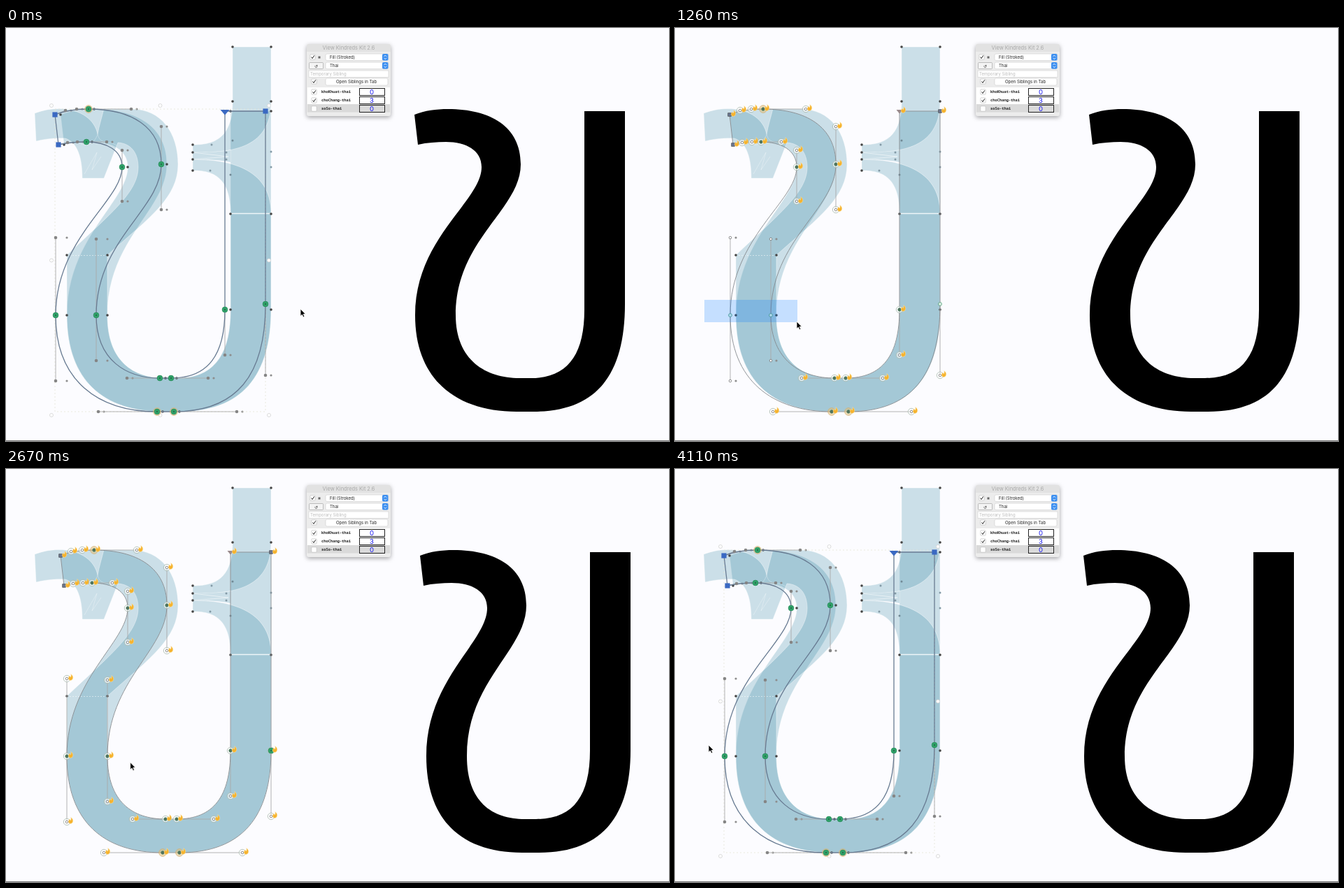
Animation, 948 px wide and 591 px high, one loop 4.14 s. Source, as an HTML page:

```html
<!DOCTYPE html>
<html lang="en">
<head>
<meta charset="utf-8">
<title>Glyph alignment</title>
<style>
  html, body { margin: 0; width: 100%; height: 100%; overflow: hidden; background: #fcfcff; }
  svg { display: block; width: 948px; height: 591px; }
  text { font-family: Inter, Roboto, "Liberation Sans", sans-serif; font-size: 6px; fill: #222; }
  .sib { fill: rgba(7, 107, 140, .2); stroke: rgba(255, 255, 255, .4); stroke-width: 1; }
  .seam { fill: none; stroke: rgba(255, 255, 255, .5); stroke-width: 1; }
  .dash { fill: none; stroke: #e4e4d6; stroke-width: .8; stroke-dasharray: 2 3; }
  .mono { font: bold 5.4px "Noto Sans Mono", "DejaVu Sans Mono", monospace; }
  .num { font-size: 9.5px; fill: #1515ee; text-anchor: middle; }
  .panel { filter: drop-shadow(0 2px 3px rgba(0, 0, 0, .35)); }
</style>
</head>
<body>
<svg viewBox="0 0 948 591">
  <defs>
    <path id="flame" d="M1 3.5C-.8 1 1.4-.6 1.8-2C2.6-1.2 3-.8 3.1.1C4.4-1 4.2-2.8 3.7-4.4C6.3-2.9 7.5.2 6.2 2.5C5.2 4.7 2.2 5 1 3.5Z" fill="#f6b32e" stroke="#fbe3a4" stroke-width=".5"/>
  </defs>

  <g id="siblings">
    <path class="sib" id="sibA"/>
    <path class="sib" d="M41 122C54 117 67 115 80 115.5C107 117 127 131 131 152C133 140 137 128 140 115.5L180 116C222 116 246 150 246 195C246 245 200 275 145 325V411C145 476 181 501 228 501H244C297 501 321 468 321 403V266H379V403C379 497 338 549 248 549H224C140 549 87 505 87 411V325C150 265 189 235 189 199C189 178 178 165 160 164L140 215H109C109 195 106 165 85 158C70 157 55 159 43 162Z"/>
    <path class="sib" d="M324 27H379V105C379 177 315 178 267 178V167C294 167 324 161 324 105Z"/>
    <path class="sib" d="M267 188C315 188 379 199 379 265H321C321 210 292 204 267 204Z"/>
    <path class="sib" style="stroke:none" d="M267 178C290 178 305 177.5 321 175V192C305 188.5 290 188 267 188Z"/>
    <path class="seam" d="M267 178L318 184L267 188M321 265.5H379"/>
    <path class="seam" d="M112 209L130 178L123 203L136 184M107 166C120 171 128 161 131 152M131 152C135 168 146 160 158 168" opacity=".6"/>
    <path class="seam" d="M87 325.5H145" stroke-dasharray="2 2"/>
  </g>
  <g id="marks"></g>
  <path id="black"  transform="translate(514)"/>
  <g id="edit"></g>
  <rect id="marquee" fill="rgba(0,120,255,.22)"/>

  <g class="panel">
    <rect x="430" y="23" width="120" height="103" rx="3" fill="#ececec"/>
  </g>
  <path d="M430 34V26a3 3 0 0 1 3-3H547a3 3 0 0 1 3 3V34Z" fill="#e2e2e2"/>
  <text x="490" y="31.3" text-anchor="middle" style="font-size:7.4px;fill:#a9a9a9">View Kindreds Kit 2.6</text>
  <g fill="#fff" stroke="#cfcfcf" stroke-width=".6">
    <rect x="457" y="37" width="90" height="9.5" rx="2"/>
    <rect x="457" y="49" width="90" height="9.5" rx="2"/>
    <rect x="433.500" y="49.500" width="20" height="9" rx="1" fill="#f4f4f4" stroke="#999"/>
    <rect x="433" y="61" width="114" height="9.500"/>
    <rect x="457" y="72" width="89" height="10" rx="2"/>
    <rect x="431" y="85" width="118" height="24" stroke="none"/>
    <rect x="431" y="109" width="118" height="11.500" fill="#dadada" stroke="none"/>
  </g>
  <rect x="446.500" y="40.500" width="3" height="3" fill="#666"/>
  <g id="steppers"></g>
  <text x="463" y="44">Fill (Stroked)</text>
  <text x="463" y="56">Thai</text>
  <text x="443.500" y="56.500" text-anchor="middle" style="font-family:'DejaVu Sans',sans-serif">↺</text>
  <text x="435" y="67.700" style="fill:#bdbdbd">Temporary Sibling</text>
  <text x="501" y="79.300" text-anchor="middle">Open Siblings in Tab</text>
  <g id="rows"></g>

  <path d="M0 590.5H948" stroke="#777"/>
  <path id="cursor" d="M0 0V10.300L2.400 8.200L4 11.800L5.800 11L4.200 7.500H7.300Z" fill="#000" stroke="#fff" stroke-width=".8"/>
</svg>
<script>
const LOOP = 4140, STEP = 30, NUDGE = 8;
const $ = id => document.getElementById(id);

// Outline in its aligned position
const OUTLINE = 'M83 167 C96 164 110 163 123 163 C152 163 174 175 174 199 C174 248 87 300 87 411 ' +
  'C87 505 140 549 224 549 L248 549 C338 549 379 497 379 403 L379 119 L321 119 L321 403 ' +
  'C321 468 297 501 244 501 L228 501 C181 501 145 476 145 411 C145 302 230 260 230 195 ' +
  'C230 141 187 116 126 116 C109 116 93 118 78 124';

const segs = OUTLINE.match(/[MLC][^MLC]*/g).map(s => {
  const n = s.slice(1).trim().split(/\s+/).map(Number), pts = [];
  for (let i = 0; i < n.length; i += 2) pts.push({ x: n[i], y: n[i + 1], node: i === n.length - 2 });
  return { cmd: s[0], pts };
});

const isLeft = p => (p.x === 87 || p.x === 145) && p.y > 290;
const isRight = p => p.x === 379 && p.y === 403;
const isCorner = p => p.y === 167 || p.y === 124 || (p.x === 379 && p.y === 119);
const isStart = p => p.x === 321 && p.y === 119;
const isZone = p => p.node && (p.y === 549 || p.y === 116);

function pose(s) {
  return segs.map(({ cmd, pts }) => ({
    cmd,
    pts: pts.map(p => {
      const x = p.x - (s.all ? 0 : NUDGE) - (isLeft(p) && !s.left ? NUDGE : 0);
      const y = p.y - (isRight(p) && !s.right ? NUDGE : 0);
      const on = s.sel === 'all' || (s.sel === 'left' && isLeft(p)) || (s.sel === 'right' && isRight(p));
      return { x, y, node: p.node, base: p, on, hit: x === p.x && y === p.y };
    })
  }));
}

const pathOf = list => list.map(g => g.cmd + g.pts.map(p => p.x + ' ' + p.y).join(' ')).join('') + 'Z';
const dot = (x, y, r, fill, stroke = 'none', w = .8) =>
  `<circle cx="${x}" cy="${y}" r="${r}" fill="${fill}" stroke="${stroke}" stroke-width="${w}"/>`;
const box = (x, y, h, fill, stroke = 'none') =>
  `<rect x="${x - h}" y="${y - h}" width="${2 * h}" height="${2 * h}" fill="${fill}" stroke="${stroke}" stroke-width=".6"/>`;

function handleLines(list) {
  let out = '', prev;
  const line = (a, b) => {
    const red = b.on && !b.hit && b.base.x === 87 && b.base.node && list.sel === 'left';
    out += `<path d="M${a.x} ${a.y}L${b.x} ${b.y}" stroke="${red ? '#c39a9f' : '#aaa'}" stroke-width=".9"/>`;
  };
  for (const { cmd, pts } of list) {
    const end = pts[pts.length - 1];
    if (cmd === 'C') { line(pts[0], prev); line(pts[1], end); }
    prev = end;
  }
  return out;
}

function mark(p, sel) {
  const { x, y, on, hit, base } = p, all = sel === 'all';
  let out = '';
  if (isZone(base)) out += dot(x, y, 5.4, 'rgba(226,190,120,.55)', '#d3b071', .7);
  else if (hit && !isCorner(base) && !isStart(base)) out += dot(x, y, 4.7, 'rgba(255,255,255,.6)', '#a9b9ae', .8);
  if (!p.node) {
    const red = sel === 'left' && !hit && base.x === 87;
    out += all ? dot(x, y, 2.3, hit ? '#444' : '#858585') : dot(x, y, 1.8, '#fff', red ? '#b78088' : '#777');
  } else if (isStart(base)) {
    const r = on ? 6.5 : 4.5;
    out += `<path d="M${x - r} ${y - 2}H${x + r}L${x} ${y + r - 1}Z" fill="${on ? '#3a69c2' : '#9a8a8c'}"/>`;
  } else if (isCorner(base)) {
    out += on ? box(x, y, 3.6, '#3a69c2') : box(x, y, 2.3, '#68738c', '#444');
  } else if (on) {
    out += dot(x, y, 3.9, '#2fa36a', '#278757', .7) + dot(x, y, 1.2, '#25704c');
  } else {
    out += hit ? dot(x, y, 2.2, '#55705f', '#3f7d5b') : dot(x, y, 2.4, '#e4f4eb', '#4a9a70');
  }
  if (hit) out += `<use href="#flame" x="${x + 2}" y="${y - 2}"/>`;
  return out;
}

function selectionBox(pts) {
  const nodes = pts.filter(p => p.on && p.node);
  if (nodes.length < 2) return '';
  const xs = nodes.map(p => p.x), ys = nodes.map(p => p.y);
  const x0 = Math.min(...xs), x1 = Math.max(...xs), y0 = Math.min(...ys), y1 = Math.max(...ys);
  const tall = y1 > y0, pad = 5, mx = (x0 + x1) / 2, my = (y0 + y1) / 2;
  let out = tall ? `<rect class="dash" x="${x0}" y="${y0}" width="${x1 - x0}" height="${y1 - y0}"/>` : '';
  for (const x of [x0 - pad, mx, x1 + pad])
    for (const y of tall ? [y0 - pad, my, y1 + pad] : [my])
      if (x !== mx || (tall && y !== my)) out += dot(x, y, 2.5, '#fff', '#d2d2d2');
  return out;
}

function drawEdit(s) {
  const list = pose(s), d = pathOf(list), pts = list.flatMap(g => g.pts), all = s.sel === 'all';
  list.sel = s.sel;
  $('black').setAttribute('d', d);
  $('edit').innerHTML = selectionBox(pts) + handleLines(list) +
    `<path d="${d}" fill="none" stroke="${all ? '#687b92' : '#858a8e'}" stroke-width="${all ? 1.3 : .9}"/>` +
    pts.map(p => mark(p, s.sel)).join('');
}

function drawStatic() {
  $('sibA').setAttribute('d', OUTLINE + 'Z');
  const grid = (xs, ys, r, c) => xs.flatMap(x => ys.map(y => dot(x, y, r, c))).join('');
  $('marks').innerHTML =
    segs.flatMap(g => g.pts).map(p => dot(p.x, p.y, p.node ? 1.8 : 1.6, p.node ? '#444' : '#8d8d8d')).join('') +
    grid([324, 379], [27, 105], 1.8, '#444') + grid([267], [167, 178, 188, 204], 1.8, '#444') +
    grid([321, 379], [266], 1.8, '#444') + grid([87, 145], [325], 1.8, '#444') +
    grid([315], [178, 188], 1.5, '#8299a5') + grid([379], [177, 199], 1.5, '#8299a5') +
    dot(294, 167, 1.5, '#8299a5') + dot(292, 204, 1.5, '#8299a5') +
    dot(324, 161, 1.5, '#708894') + dot(321, 210, 1.5, '#708894');

  const check = (x, y, on) => `<rect x="${x - 3.7}" y="${y - 3.7}" width="7.4" height="7.4" rx="1.2" fill="#fff" stroke="#bbb" stroke-width=".6"/>` +
    (on ? `<path d="M${x - 2} ${y}l1.500 2l2.800 -4.200" fill="none" stroke="#222" stroke-width="1"/>` : '');
  $('steppers').innerHTML = [37, 49].map(y =>
    `<rect x="538" y="${y}" width="8.500" height="9.500" rx="1.800" fill="#3c8ff0"/>` +
    `<path d="M540.500 ${y + 3.8}l1.800 -1.800l1.800 1.800M540.500 ${y + 5.800}l1.800 1.800l1.800 -1.800" fill="none" stroke="#fff" stroke-width=".9"/>`).join('') +
    check(438.5, 41.5, true) + check(440.5, 76.5, true);
  $('rows').innerHTML = [['khoKhuat-thai', 0], ['choChang-thai', 3], ['soSo-thai', 0]].map(([name, n], i) => {
    const y = 91 + 12 * i;
    return check(440.5, y + .5, i < 2) + `<text class="mono" x="451" y="${y + 1.8}">${name}</text>` +
      `<rect x="505.500" y="${y - 4.500}" width="36" height="10" fill="${i < 2 ? '#fff' : '#dadada'}" stroke="#222"/>` +
      `<text class="num" x="523" y="${y + 4.300}">${n}</text>`;
  }).join('');
}

// Edits in order of time, then undone step by step
const EDITS = [
  [0, { sel: 'all' }],
  [600, { sel: 'all', all: 1 }],
  [930, { sel: '', all: 1 }],
  [1290, { sel: 'left', all: 1 }],
  [1440, { sel: 'left', all: 1, left: 1 }],
  [1650, { sel: '', all: 1, left: 1 }],
  [2040, { sel: 'right', all: 1, left: 1 }],
  [2130, { sel: 'right', all: 1, left: 1, right: 1 }],
  [3150, { sel: 'right', all: 1, left: 1 }],
  [3480, { sel: 'left', all: 1 }],
  [3900, { sel: 'all' }]
];
const MOVES = [
  [0, 421, 402], [690, 421, 402], [930, 42, 389], [990, 42, 389], [1230, 174, 420], [1620, 174, 420],
  [1800, 359, 377], [1830, 359, 377], [1950, 411, 413], [2340, 411, 413], [2700, 173, 420],
  [3420, 173, 420], [3630, 48, 395], [LOOP, 48, 395]
];
const DRAGS = [[990, 1290, 42, 389], [1830, 2040, 359, 377]];

function pointer(t) {
  const i = MOVES.findIndex(m => m[0] > t), [t0, x0, y0] = MOVES[i - 1], [t1, x1, y1] = MOVES[i];
  const k = (t - t0) / (t1 - t0), e = k * k * (3 - 2 * k);
  return [x0 + (x1 - x0) * e, y0 + (y1 - y0) * e];
}

let shown;
function frame(now) {
  const t = Math.floor(now % LOOP / STEP) * STEP;
  const state = EDITS.filter(e => e[0] <= t).pop()[1];
  if (state !== shown) drawEdit(shown = state);
  const [x, y] = pointer(t), drag = DRAGS.find(d => t >= d[0] && t < d[1]);
  $('cursor').setAttribute('transform', `translate(${x} ${y})`);
  const [, , ax, ay] = drag || [0, 0, x + 1, y + 1];
  const area = { x: ax, y: ay, width: Math.max(0, x + 1 - ax), height: Math.max(0, y + 1 - ay) };
  for (const k in area) $('marquee').setAttribute(k, area[k]);
}

drawStatic();
const start = performance.now();
(function tick() {
  frame(performance.now() - start);
  requestAnimationFrame(tick);
})();
</script>
</body>
</html>
```
